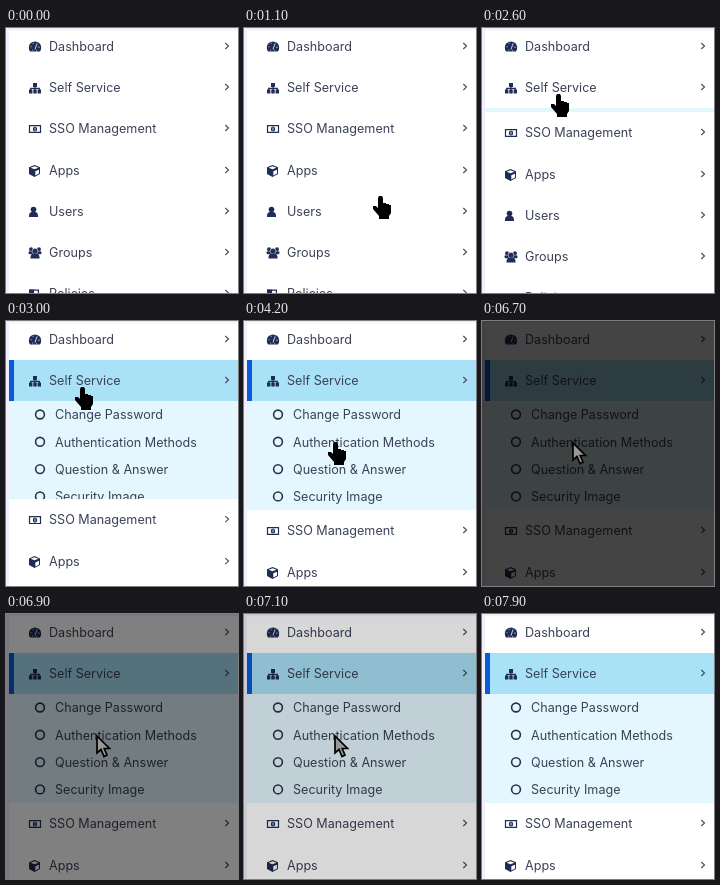
An HTML page for the animation above (8500 ms loop, 232 by 265 pixels).

```html
<!DOCTYPE html>
<html lang="en">
<head>
<meta charset="utf-8">
<title>Side menu</title>
<style>
  html, body { margin: 0; width: 100%; height: 100%; overflow: hidden; background: #fff; }
  svg { display: block; width: 232px; height: 265px; font: 12.6px Inter, "Open Sans", sans-serif; }
  text { fill: #3b4258; }
  .icon { fill: #1f2c54; }
  .line { fill: none; stroke: #1f2c54; stroke-width: 1.2; }
  .cut { fill: none; stroke: #fff; stroke-width: .8; }
  .chevron { fill: none; stroke: #454a5c; stroke-width: 1.1; }
  .ring { fill: none; stroke: #2b314a; stroke-width: 1.6; }
</style>
</head>
<body>
<svg viewBox="0 0 232 265">
  <linearGradient id="edge" x2="0" y2="1"><stop stop-color="#e8e8ee"/><stop offset="1" stop-color="#fff"/></linearGradient>
  <rect width="232" height="265" fill="#fff"/>
  <rect width="232" height="3" fill="url(#edge)"/>
  <g id="active">
    <rect x="3" y="39" width="229" height="41" fill="#a9e1f6"/>
    <rect x="3" y="39" width="5" height="41" fill="#0b5ad9"/>
  </g>
  <g id="upper"></g>
  <rect x="3" y="80" width="229" height="109" fill="#e5f7fe"/>
  <g id="sub"></g>
  <g id="lower"><rect y="80" width="232" height="265" fill="#fff"/></g>
  <rect width="3" height="265" fill="#f0effb"/>
  <rect id="shade" width="232" height="265"/>
  <g id="cursor">
    <path id="hand" d="M5 2L6 0H9L10 2V7H13V8H16V9H18V17L16 20V23H6V20L0 13V10H3L5 12Z"/>
    <path id="arrow" d="M7 1V18L11 14.5L14 21.5L17 20L14.2 13.5H19.5Z" stroke="#000" stroke-width="1.7"/>
  </g>
</svg>
<script>
const $ = id => document.getElementById(id);
const show = (id, on) => $(id).style.display = on ? "" : "none";

// Icons are centred on (0, 0)
const icons = {
  gauge: `<path d="M-4.8 4.5A6.2 6.2 0 1 1 4.8 4.5Z"/><path class="cut" d="M0 2.5L1.8-2.8"/>
    <circle class="cut" r="4" stroke-dasharray="1 3"/>`,
  tree: `<path d="M-2-5h4v4h-4zM-6 1.5h3.4v4h-3.4zM-1.7 1.5h3.4v4h-3.4zM2.6 1.5h3.4v4h-3.4z"/>
    <path class="line" d="M0-1V2M-4.3 2V.3H4.3V2"/>`,
  money: `<path class="line" d="M-5.5-3.4H5.5V3.4H-5.5Z"/><ellipse rx="2.2" ry="2.6"/><path class="cut" d="M0-1.5V1.5"/>`,
  cube: `<path d="M-.5-6L5-3.7V3L-.5 6L-6 3V-3.7Z"/>
    <path fill="#fff" d="M.3.3L4-1.3V2.6L.3 4.5ZM-.5-4.8L3.4-3.3L-.5-1.8L-4.4-3.3Z"/>`,
  user: `<circle cx="-1.5" cy="-2.4" r="2.8"/><path d="M-6 5Q-6.3.3-3.4 0H.4Q3.3.3 3 5Z"/>`,
  group: `<circle cx="-4" cy="-3.8" r="1.9"/><circle cx="4" cy="-3.8" r="1.9"/>
    <rect x="-6.4" y="-1.8" width="12.8" height="3" rx="1"/>
    <circle cy="-1.8" r="2.9" stroke="#fff" stroke-width=".5"/><path d="M-4.5 5.6Q-4.7 1-2 .7H2Q4.7 1 4.5 5.6Z"/>`,
  page: `<path class="line" d="M-5.4-3.8H3.4V6H-5.4Z"/><path d="M-6-4.4h5v10h-5z"/>`
};

const rows = [["Dashboard", "gauge"], ["Self Service", "tree"], ["SSO Management", "money"],
  ["Apps", "cube"], ["Users", "user"], ["Groups", "group"], ["Policies", "page"]];
rows.forEach(([label, icon], i) => {
  $(i < 2 ? "upper" : "lower").innerHTML += `<g transform="translate(0 ${Math.round(19 + 41.2 * i)})">
    <g class="icon" transform="translate(29 0)">${icons[icon]}</g><text x="43" y="4.2">${label}</text>
    <path class="chevron" d="M219.3-4L222.5-1L219.3 2"/></g>`;
});

["Change Password", "Authentication Methods", "Question &amp; Answer", "Security Image"].forEach((label, i) => {
  const y = 94 + 27.3 * i;
  $("sub").innerHTML += `<circle class="ring" cx="34" cy="${y - .5}" r="4.4"/><text x="49" y="${y + 4.2}">${label}</text>`;
});

const progress = (t, from, to) => Math.min(1, Math.max(0, (t - from) / (to - from)));
const bezier = (a, b, c, f) => a + 2 * f * (b - a) + f * f * (a - 2 * b + c);

// Cursor moves along quadratic curves and rests at the end of each
const corner = [213, -2], item = [69, 66], subItem = [84, 121], row = [73, 94];
const moves = [
  { start: 200, end: 300, path: [corner, corner, corner] },
  { start: 700, end: 1500, path: [[179, 246], [132, 166], row] },
  { start: 1500, end: 1800, path: [row, [85, 78], item] },
  { start: 3600, end: 4200, path: [item, [130, 140], subItem] },
  { start: 7500, end: 7800, path: [subItem, [30, 150], corner] }
];

function cursorAt(t) {
  const { start, end, path } = moves.findLast(m => t >= m.start) || moves[0];
  const f = progress(t, start, end);
  return [0, 1].map(n => Math.round(bezier(...path.map(p => p[n]), f)));
}

const cursorVisible = t => t >= 200 && t < 300 || t >= 700 && t < 7900;

function menuHeight(t) {
  if (t < 2600) return 0;
  const f = progress(t, 2600, 3100);
  return 4 + 105 * (1 - (1 - f) ** 2 * (1 + 2 * f));
}

function shadeLevel(t) {
  if (t < 5700) return 0;
  if (t < 5800) return .69;
  return .375 * (1 + Math.cos(Math.PI * progress(t, 6640, 7300)));
}

function draw(t) {
  const shade = shadeLevel(t);
  show("active", t >= 2700);
  $("lower").setAttribute("transform", `translate(0 ${menuHeight(t)})`);
  $("shade").setAttribute("opacity", shade);
  show("cursor", cursorVisible(t));
  $("cursor").setAttribute("transform", `translate(${cursorAt(t)})`);
  show("hand", !shade);
  show("arrow", shade);
  $("arrow").setAttribute("fill", t < 6700 ? "#ccc" : "#999");
}

const start = performance.now();
function tick() {
  const t = (performance.now() - start) % 8500;
  draw(Math.floor(t / 100) * 100);
  requestAnimationFrame(tick);
}
tick();
</script>
</body>
</html>
```
